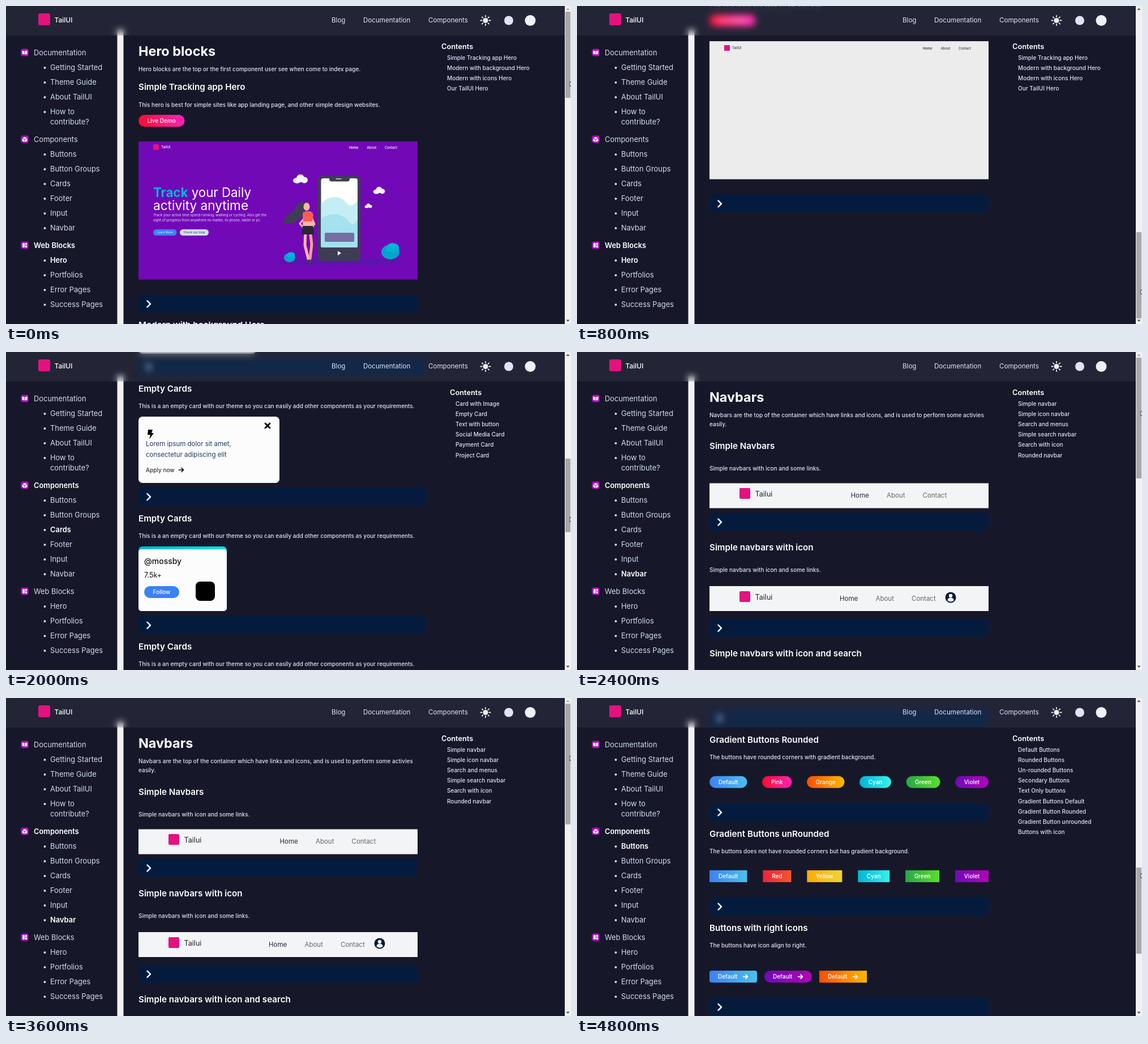
Recreate the animation shown at these times as an HTML page. Size 998 by 561 pixels, loop 5200 ms.

```html
<!DOCTYPE html>
<html lang="en">
<head>
<meta charset="utf-8">
<title>TailUI docs</title>
<style>
html, body { margin: 0; width: 100%; height: 100%; overflow: hidden; background: #16182a; }
svg { position: absolute; left: 0; top: 0; width: 998px; height: 561px; }
text { font-family: Inter, Roboto, sans-serif; white-space: pre; }
#nav { position: absolute; left: 0; top: 0; width: 987px; height: 52px;
  background: rgba(255,255,255,.06); backdrop-filter: blur(6px); }
</style>
</head>
<body>
<svg id="under" viewBox="0 0 998 561"></svg>
<div id="nav"></div>
<svg id="over" viewBox="0 0 998 561"></svg>
<script>
const BLUE = '#3b82f6', PINK = '#e3127f', NAVY = '#041b3e', INK = '#3f3d56', SOFT = '#dfe5f3';

// Paint: a plain colour, or "from-to" for a horizontal gradient.
const gradients = {};
function paint(c) {
  if (!c.includes('-')) return c;
  const id = 'g' + c.replace(/[#-]/g, '');
  gradients[id] = c.split('-');
  return `url(#${id})`;
}
const text = (x, y, s, size = 10, fill = SOFT, weight = 500, anchor = 'start') =>
  `<text x="${x}" y="${y + size * .36}" font-size="${size}" fill="${fill}" font-weight="${weight}" text-anchor="${anchor}">${s}</text>`;
const box = (x, y, w, h, fill, r = 0) =>
  `<rect x="${x}" y="${y}" width="${w}" height="${h}" rx="${r}" fill="${paint(fill)}"/>`;
const oval = (x, y, rx, fill, ry = rx) => `<ellipse cx="${x}" cy="${y}" rx="${rx}" ry="${ry}" fill="${fill}"/>`;
const shape = (d, fill) => `<path d="${d}" fill="${fill}"/>`;
const line = (d, stroke, w = 2) =>
  `<path d="${d}" fill="none" stroke="${stroke}" stroke-width="${w}" stroke-linecap="round" stroke-linejoin="round"/>`;
const shift = (y, s) => `<g transform="translate(0 ${y})">${s}</g>`;
const title = s => text(234, 80, s, 23.4, '#fff', 700);
const heading = (y, s) => text(234, y, s, 15.2, '#fff', 600);
const codeBar = (y, right = 727) =>
  box(234, y - 15.5, right - 234, 31, NAVY, 6) + line(`M249.500 ${y - 4.800}l5.500 5.500l-5.500 5.500`, '#fff', 2.4);
const section = (y, name, desc, gap = 31) => heading(y, name) + text(234, y + gap, desc);
const pill = (x, y, w, s, fill, color = '#fff', r = 10.5) =>
  box(x, y - 10.5, w, 21, fill, r) + text(x + w / 2, y, s, 10, color, 500, 'middle');
const arrow = (x, y, color) => line(`M${x - 4} ${y}h8m-3.500 -3.500l3.500 3.500l-3.500 3.500`, color, 1.6);

// Hero page
const siteNav = (y, x, color) => box(260, y - 5, 10, 10, PINK, 1) + text(274, y, 'TailUI', 6.2, color) +
  text(x, y + 1, 'Home', 5.8, color, 600) + text(x + 31.5, y + 1, 'About', 5.8, color) + text(x + 63, y + 1, 'Contact', 5.8, color);
const cloud = (x, y, k) => oval(x - 6 * k, y + 2 * k, 7 * k, '#f2f2f2', 5 * k) + oval(x, y - 2 * k, 7 * k, '#f2f2f2') +
  oval(x + 7 * k, y + 1 * k, 6 * k, '#f2f2f2', 5.500 * k);
const bush = (x, y, r) => line(`M${x} ${y}v${r * 1.1}`, INK, 1.2) + oval(x, y, r, '#00a5cc', r * .8) +
  oval(x + r * .25, y - r * .45, r * .7, '#00b4d8', r * .55) + line(`M${x - r * .7} ${y}q${r * .6} ${r * .3} ${r * 1.3} -${r * .3}`, '#0b87b0', .8);

const trackArt = box(234, 239, 493, 243.5, '#7209b7') + siteNav(249, 606, '#fff') +
  text(260, 328.500, '<tspan font-weight="700" fill="#00b4d8">Track</tspan> your Daily', 22.3, '#fff', 400) +
  text(260, 352, 'activity anytime', 22.6, '#fff', 400) +
  text(260, 368.500, 'Track your active time spend running, walking or cycling. Also get the', 6.1, '#e8def6', 400) +
  text(260, 377.500, 'sight of progress from anywhere no matter, its phone, tablet or pc.', 6.1, '#e8def6', 400) +
  box(260, 394, 41.5, 11, BLUE, 5.5) + text(280.700, 399.600, 'Learn More', 5.2, '#fff', 400, 'middle') +
  box(307, 394, 51, 11, '#d4dff0', 5.5) + text(332.500, 399.600, 'Check our blog', 5.2, '#2c3d5c', 400, 'middle') +
  oval(588, 451, 112, '#5f12ae', 7) + cloud(520, 306, 1) + cloud(659, 326, .8) + cloud(640, 353, .5) +
  box(551, 299.500, 75, 150.500, INK, 8) + box(556.500, 304, 64.500, 121.500, '#fff', 4) + box(571, 299.500, 36, 10, INK, 4) +
  line('M583 305h9', '#d8d8e0', 1.4) +
  shape('M556.500 350C570 332 592 335 600 346S616 350 621 343V425.500H556.500Z', '#c5edf4') +
  shape('M556.500 376C574 362 594 366 604 379S617 380 621 377V425.500H556.500Z', '#a3e2ee') +
  box(563, 400, 52, 16, '#756fa2', 2) + shape('M586 432l6 4l-6 4z', '#fff') + bush(501, 444, 10) + bush(679, 434, 16) +
  shape('M535 348C523 341 513 349 509 359C503 368 494 365 490 383C506 385 519 380 525 367Z', INK) +
  line('M528 373l-9 11l8 9', '#ffb6a0', 3.2) + line('M529 395l-1 27l6 24', '#ffb6a0', 5) + line('M537 395l3 26l-3 25', '#f4a28c', 5) +
  line('M540 373l5 12l-9 5', '#ffb6a0', 3.2) + oval(531, 354, 5.500, '#ffb6a0', 7) + shape('M525 364h16l3 26h-20z', '#ffb6a0') +
  shape('M524 366l5-4h9l5 6l-2 12h-16z', '#ff5b55') + shape('M524 388h18l2 15h-22z', '#292638') +
  line('M533 449h5m-3 2h4', INK, 3);

const photoArt = box(234, 239, 493, 243.5, '#eadfca') + box(243, 239, 475, 243.5, '#0f4f3d') +
  oval(300, 456, 40, '#1f6f54', 16) + oval(405, 465, 55, '#0d3d33', 16) + oval(475, 440, 32, '#2a5f45', 12) +
  oval(565, 462, 42, '#1c7860', 14) + oval(660, 448, 40, '#135a46', 18);

const worker = (x, y, k, shirt, lean) => `<g transform="translate(${x} ${y}) scale(${k})">` + oval(0, 0, 4, '#a9796b') +
  shape('M-4 -1q4-7 8 0z', '#25233a') + shape(`M-5 4h10l${lean + 2} 20h-12z`, shirt) +
  line(`M${lean} 23l-4 23m6-23l3 23`, '#30304a', 4) + '</g>';
const moneyArt = shift(17.6, box(234, 221.5, 493, 243.5, '#ececec') + siteNav(233.5, 611, INK) +
  text(483, 273.500, 'We help to send money by', 15, '#303047', 300, 'middle') + text(483, 289, 'one click', 15, '#303047', 300, 'middle') +
  box(457, 305.500, 43, 10.500, BLUE, 5.2) + text(478.500, 310.800, 'Learn More', 5.2, '#fff', 400, 'middle') +
  '<path d="M234 400C254 381 272 366 298 366C338 366 356 391 395 407C435 421 476 413 499 398C530 376 526 342 561 342C603 342 618 368 640 391C682 427 708 391 727 344V465H234Z" fill="url(#hill)"/>' +
  oval(348, 449.500, 73, '#dcdce6', 3.5) + shape('M304 407h8v18l9-10l2 3l-11 16v15h-8z', '#e1e1ed') +
  shape('M287 329q21.500-9 43 0v75q-21.500 9-43 0z', INK) + line('M287 352q21 9 43 0m-43 27q21 9 43 0', '#55526c', .8) +
  line('M319 356l8-8m-30 26l-7-8m32 30l6-11', '#777', .8) + oval(319.500, 356, 4, '#6c63ff') + oval(297, 374.500, 4, '#6c63ff') + oval(322, 396.500, 4, '#6c63ff') +
  shape('M365 367q7-6 14 0l3 12l-16-1z', '#27243d') + oval(373, 374, 5, '#b37c6c') + oval(369, 365, 4, '#6c63ff') +
  shape('M362 379l14-2l7 19l-2 11h-19z', '#34334e') + line('M371 380v10m-6 0l-3 25m20-19l4 14', '#6c63ff', 2.5) +
  line('M368 405l-7 39m13-39l5 39', '#292842', 6) + line('M364 411l36-4', '#777582', 1.5) + shape('M391 405l13-2l3 16l-15 1z', '#d0d0d9') +
  worker(596, 368, .9, '#6c63ff', 5) +
  shape('M578 389l70-34l20 34l-32 30h-58z', '#69ba59') + shape('M585 382l66-23l14 29l-68 26z', '#88d36b') + oval(626, 389, 10, '#58a84b', 7) +
  worker(648, 367, 1.38, '#34324b', 0) + line('M643 374l-13-3m23 3l5-9', '#34324b', 3) +
  box(555, 390, 79, 59, INK, 3) + box(555, 388, 70, 5, '#2f2e41', 2) + box(612, 414, 22, 16, '#29283e', 3) + oval(620, 422, 3, '#6c63ff') +
  worker(663, 406, .92, '#6c63ff', 5) + line('M663 413l-8 16', '#b37c6c', 2.5));

const plainArt = box(234, 239, 493, 243.5, '#ececec') + siteNav(251, 611, INK);
const heroes = [
  ['Simple Tracking app Hero', 'This hero is best for simple sites like app landing page, and other simple design websites.', trackArt],
  ['Modern with background Hero', 'This hero is for modern web with a background image.', photoArt],
  ['Modern with icons Hero', 'This hero is for modern web with icons and story telling look.', moneyArt],
  ['Our TailUI Hero', 'This hero is the one used on our own site.', plainArt]];
const heroPage = title('Hero blocks') + text(234, 111.500, 'Hero blocks are the top or the first component user see when come to index page.') +
  heroes.map(([name, desc, art], i) => shift(i * 419.7,
    section(143, name, desc) + pill(234, 202.500, 81.5, 'Live Demo', '#ff0a34-#ff23b5') + art + codeBar(525))).join('');

// Buttons page
const widths = { Default: 66.5, Secondary: 83.5, Red: 50, Pink: 52.5, Orange: 66.5, Yellow: 62, Green: 60, Purple: 63, Cyan: 56, Violet: 59 };
const flat = { Default: BLUE, Secondary: '#d3dff0', Red: '#ef233c', Pink: '#f72585', Orange: '#ff4d00', Yellow: '#ffaa00', Green: '#27a745', Purple: '#7209b7' };
const blend = { Default: '#3b82f6-#4cc0ec', Red: '#ef233c-#f3552b', Pink: '#ff0a34-#ff23b5', Orange: '#ff4d00-#ffb700',
  Yellow: '#ffaa00-#eed43a', Cyan: '#00b4d8-#35f3e8', Green: '#27a745-#5ae02c', Violet: '#7209b7-#b105b8' };
function buttonRow(y, labels, colors, r) {
  const items = labels.split(' ').map(s => s.split(':'));
  const gap = (493 - items.reduce((sum, [s]) => sum + widths[s], 0)) / (items.length - 1);
  let x = 234;
  return items.map(([label, tone = label]) => {
    const w = widths[label], left = x;
    x += w + gap;
    if (r < 0) return text(left + w / 2, y, label, 10, colors[tone], 500, 'middle');
    const round = colors === flat && tone === 'Orange' && !r ? 10.5 : r;
    return pill(left, y, w, label, colors[tone], tone === 'Secondary' ? '#2a456b' : '#fff', round);
  }).join('');
}
const standard = 'Default Secondary Red Orange Green Purple';
const buttonSets = [
  ['Default Buttons', 'The buttons have very little rounded corners.', 'Default Default:Secondary Red Pink Orange Yellow', flat, 4],
  ['Rounded Buttons', 'The buttons have rounded corners.', standard, flat, 10.5],
  ['Un-rounded Buttons', 'The buttons does not have rounded corners.', standard, flat, 0],
  ['Secondary Buttons', 'The buttons are used for secondary actions.', standard, flat, 4],
  ['Text Only Buttons', 'The buttons have text only.', standard, flat, -1],
  ['Gradient Buttons Default', 'The buttons have gradient background.', 'Default Pink Orange Cyan Green Violet', blend, 4],
  ['Gradient Buttons Rounded', 'The buttons have rounded corners with gradient background.', 'Default Pink Orange Cyan Green Violet', blend, 10.5],
  ['Gradient Buttons unRounded', 'The buttons does not have rounded corners but has gradient background.', 'Default Red Yellow Cyan Green Violet', blend, 0]];
const iconButton = (x, tone, r) => box(x, 218.500, 84, 21, blend[tone], r) + text(x + 15, 229, 'Default', 10, '#fff') + arrow(x + 63.5, 229, '#fff');
const buttonsPage = title('Buttons') + text(234, 111.500, 'Buttons allows users to perform on click activities.') +
  buttonSets.map(([name, desc, labels, colors, r], i) => shift(i * 166.2,
    section(143, name, desc) + buttonRow(218, labels, colors, r) + codeBar(271))).join('') +
  shift(8 * 166.2, section(143, 'Buttons with right icons', 'The buttons have icon align to right.') +
    iconButton(234, 'Default', 4) + iconButton(331, 'Violet', 10.5) + iconButton(428, 'Orange', 0) + codeBar(282));

// Cards page
const emptyCard = y => section(y, 'Empty Cards', 'This is a an empty card with our theme so you can easily add other components as your requirements.');
const cardsPage = title('Cards') + text(234, 111.500, 'Cards are used to show content and actions on a single topic.') +
  section(143, 'Card with Image', 'This is a card with an image.') + box(234, 192, 208, 579, '#fcfcfc', 7) +
  shift(768, codeBar(25.500, 743) + emptyCard(64.500) + box(234, 114, 249, 117, '#fcfcfc', 7) +
    shape('M251 137h8l-2 6h4l-8 11l2-8h-5z', '#000') + line('M458 126l8 8m0-8l-8 8', '#000', 2.8) +
    text(247, 162, 'Lorem ipsum dolor sit amet,', 11.5, '#1e3a66', 400) + text(247, 180.500, 'consectetur adipiscing elit', 11.5, '#1e3a66', 400) +
    text(247, 208, 'Apply now', 10.15, '#111', 400) + arrow(309.500, 208, '#000') + codeBar(255, 743) +
    emptyCard(293.700) + box(234, 343, 156, 114, '#00b4d8-#00e0ee', 7) + box(234, 348, 156, 109, '#fcfcfc', 5) +
    text(244, 369, '@mossby', 14, '#111', 500) + text(244, 393.500, '7.5k+', 12.6, '#111', 400) + pill(244, 423.500, 62, 'Follow', BLUE) +
    box(335, 405, 34, 34, '#000', 8) + codeBar(481.500, 743) + emptyCard(519.700));

// Navbar page
const search = (x, right, y) => box(x, y - 11.5, right - x, 23, '#d3dff0', 11.5) + text(x + 14, y, 'Username', 10.4, '#69717f', 400) +
  box(right - 65.5, y - 11.5, 65.5, 23, BLUE, 11.5) + text(right - 32.7, y, 'Search', 10.2, '#fff', 500, 'middle');
const user = (x, y) => oval(x, y, 9.5, NAVY) + oval(x, y - 3, 3.2, '#f3f4f6') + shape(`M${x - 5.5} ${y + 5.500}q0-5 5.500-5t5.500 5q-5.500 4-11 0z`, '#f3f4f6');
const strip = (y, h = 39, r = 0) => box(234, y, 493, h, '#f3f4f6', r);
const links = (x, y, step) => ['Home', 'About', 'Contact'].map((s, i) => text(x + i * step, y, s, 11.5, i ? '#666' : '#24283a', 400)).join('');
const brandName = (x, y) => text(x, y, 'Tailui', 12.6, '#222', 400);
const brand = (x, y) => box(x, y - 10.500, 19, 19, PINK, 2) + brandName(x + 27.500, y);
const iconSearch = 'Simple navbars with icon and search.';
const navbarPage = title('Navbars') + text(234, 111.500, 'Navbars are the top of the container which have links and icons, and is used to perform some activies') +
  text(234, 127.500, 'easily.') + section(166, 'Simple Navbars', 'Simple navbars with icon and some links.', 39) +
  strip(231.500, 44) + brand(287, 250.500) + links(483.500, 253, 63.5) + codeBar(299.500) +
  section(345, 'Simple navbars with icon', 'Simple navbars with icon and some links.', 39) +
  strip(413, 44) + brand(287, 432.500) + links(464, 435, 63.5) + user(660, 433) + codeBar(486.500) +
  section(532, 'Simple navbars with icon and search', iconSearch, 39) + strip(600) + brandName(294, 619) +
  search(382, 598, 619.500) + user(665, 618) + codeBar(663) +
  shift(684, section(25, 'Simple Navbars', iconSearch, 39) + strip(93) + brandName(294, 112.500) +
    search(382, 598, 112.500) + user(665.500, 111) + codeBar(156.500) +
    section(202, 'Simple Navbar', 'Simple navbar with icon and search.', 39) + strip(269.500) + search(286, 501, 289) + user(665.500, 287.500) + codeBar(333) +
    section(378.700, 'Simple navbars with search', 'Simple rounder navbar with icon and some search.', 39) + strip(446, 44, 22) + brand(261, 466) +
    links(353, 468, 43) + search(499, 667, 468) + user(692.500, 466.500) + codeBar(514.500));

const pages = {
  Hero: { art: heroPage, thumb: 152, toc: heroes.map(h => h[0]) },
  Buttons: { art: buttonsPage, thumb: 152, toc: ['Default Buttons', 'Rounded Buttons', 'Un-rounded Buttons', 'Secondary Buttons', 'Text Only buttons',
    'Gradient Buttons Default', 'Gradient Button Rounded', 'Gradient Button unrounded', 'Buttons with icon'] },
  Cards: { art: cardsPage, thumb: 130, tocX: 784, toc: ['Card with Image', 'Empty Card', 'Text with button', 'Social Media Card', 'Payment Card', 'Project Card'] },
  Navbar: { art: navbarPage, thumb: 213, toc: ['Simple navbar', 'Simple icon navbar', 'Search and menus', 'Simple search navbar', 'Search with icon', 'Rounded navbar'] }
};

// Fixed parts
const menu = [
  [82, 'Documentation', ['Getting Started', 'Theme Guide', 'About TailUI', 'How to']],
  [235, 'Components', ['Buttons', 'Button Groups', 'Cards', 'Footer', 'Input', 'Navbar']],
  [422, 'Web Blocks', ['Hero', 'Portfolios', 'Error Pages', 'Success Pages']]];
const glyphs = [
  shape('M28.500 78.500l4 1v6l-4-1zm9 0l-4 1v6l4-1z', '#fff'),
  shape('M33 231l4 2l-4 2l-4-2zm-4.500 3l4 2v4l-4-2zm9 0l-4 2v4l4-2z', '#fff'),
  box(29, 418, 4, 8, '#fff', 1) + box(34, 418, 3, 3.5, '#fff') + box(34, 422.500, 3, 3.5, '#fff')];
const sidebar = active => menu.map(([y, name, items], i) => {
  const style = on => on ? ['#fff', 600] : ['#d0dbed', 400];
  return box(26, y - 6.5, 13.5, 13, '#8a0bb0-#cb14c4', 3.5) + glyphs[i] + text(49, y, name, 12.9, ...style(items.includes(active))) +
    items.map((s, k) => oval(68.500, y + 27 + 26 * k, 2, '#d0dbed') + text(78, y + 26 * (k + 1), s, 12.9, ...style(s === active))).join('');
}).join('') + text(78, 204, 'contribute?', 12.9, '#d0dbed', 400);

const rays = Array.from({ length: 8 }, (_, i) => `<path d="M847 19v-2.200" stroke="#eee" stroke-width="1.800" stroke-linecap="round" transform="rotate(${i * 45} 847 25.500)"/>`).join('');
const navbar = box(57, 13, 21, 21, PINK, 3) + text(85.500, 24.500, 'TailUI', 12, '#fff') +
  text(575, 25, 'Blog', 11.6, SOFT, 400) + text(631, 25, 'Documentation', 11.6, SOFT, 400) + text(746, 25, 'Components', 11.6, SOFT, 400) +
  oval(847, 25.500, 4.6, '#eee') + rays + oval(888, 25.500, 8, '#dfe5f3') + oval(926, 25.500, 9.5, '#eef1f8');

function scrollbar(scroll, thumb) {
  return box(987, 0, 11, 561, '#f1f1f1') + box(988, 10 + scroll * thumb / 561, 9, thumb, '#a8a8a8') +
    shape('M989.500 7l3-3.500l3 3.500z', scroll ? '#505050' : '#a3a3a3') + shape('M989.500 553.500l3 3.500l3-3.500z', '#505050');
}
const cursor = (x, y) => `<path d="M${x} ${y}v9l2-2l1.500 3.500l1.500-.700l-1.500-3.300h3z" fill="#fff" stroke="#000" stroke-width=".700"/>`;

// page, scroll offset, pointer y, pointer x
const steps = [
  ['Hero', 0, 133], ['Hero', 857, 352], ['Hero', 1436, 500],
  ['Buttons', 0, 121], ['Cards', 0, 118], ['Cards', 768, 291],
  ['Navbar', 0, 104], ['Navbar', 684, 361, 989], ['Navbar', 853, 410, 989], ['Navbar', 0, 102],
  ['Buttons', 0, 60], ['Buttons', 564, 175], ['Buttons', 1067, 309]];
const STEP = 400;

sidebar(''); // registers its gradient
const defs = '<defs>' + Object.entries(gradients).map(([id, [a, b]]) =>
  `<linearGradient id="${id}"><stop stop-color="${a}"/><stop offset="1" stop-color="${b}"/></linearGradient>`).join('') +
  `<linearGradient id="hill">${['#cfcfcf', '#8d8381', '#5c4c4c', '#5c4c4c', '#a39b99', '#e0e0e0'].map((c, i) =>
    `<stop offset="${i / 5}" stop-color="${c}"/>`).join('')}</linearGradient></defs>`;

const under = document.getElementById('under'), over = document.getElementById('over');
let shown = -1;
function draw(now) {
  const index = Math.floor(now / STEP) % steps.length;
  if (index !== shown) {
    shown = index;
    const [name, scroll, py, px = 996] = steps[index];
    const { art, thumb, toc, tocX = 769 } = pages[name];
    under.innerHTML = defs + box(196.5, 42, 11, 519, '#f1f1f1') + shift(-scroll, art);
    over.innerHTML = navbar + sidebar(name) + text(tocX, 71.500, 'Contents', 12.8, '#fff', 600) +
      toc.map((s, i) => text(tocX + 10, 91 + 18.2 * i, s)).join('') + scrollbar(scroll, thumb) + cursor(px, py);
  }
}
const start = performance.now();
function tick() {
  draw(performance.now() - start);
  requestAnimationFrame(tick);
}
tick();
</script>
</body>
</html>
```
